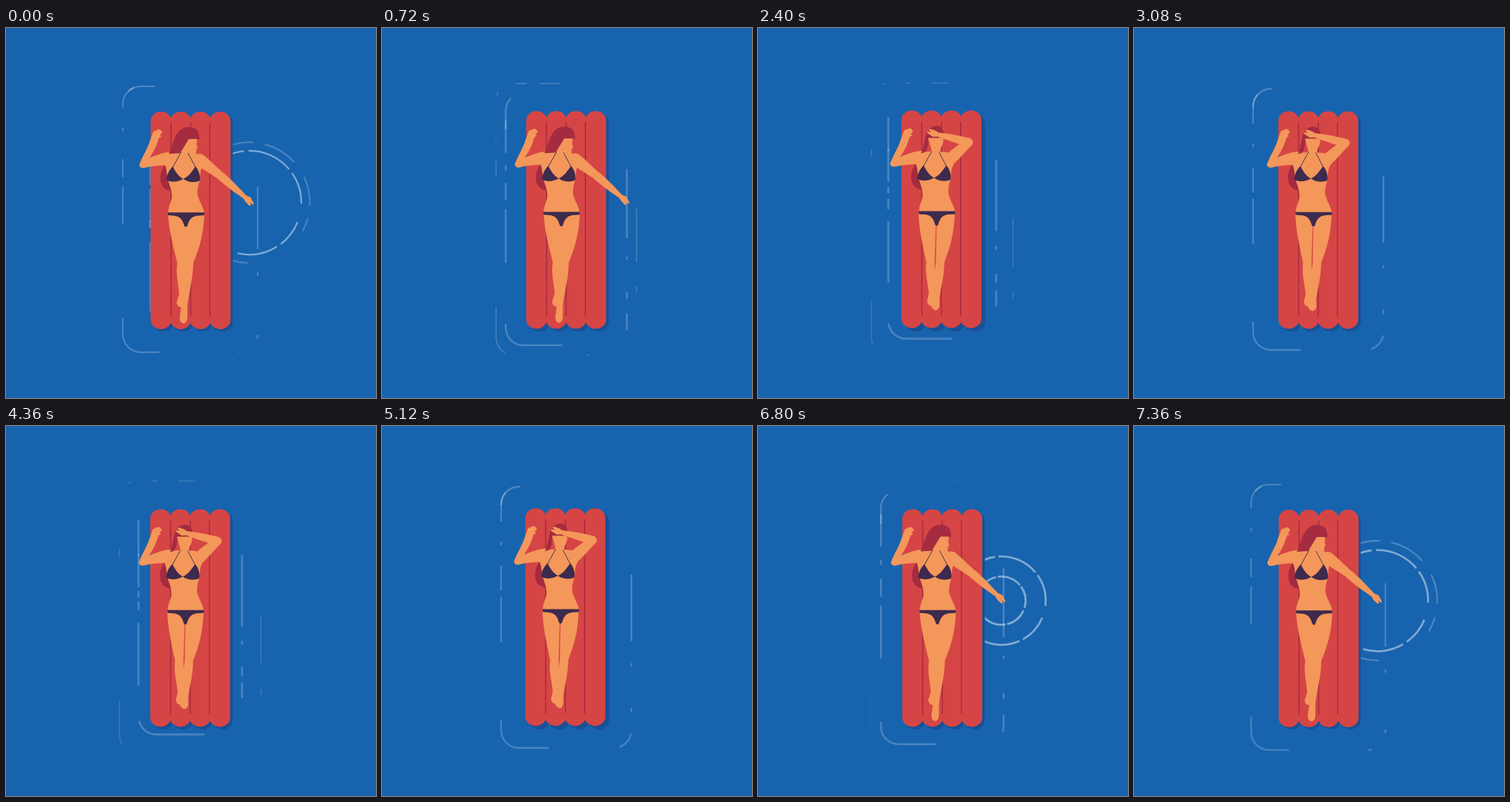
An HTML page that plays this animation: 500 px wide and 500 px high, repeating every 7.4 s.

```html
<!DOCTYPE html>
<html lang="en">
<head>
<meta charset="utf-8">
<title>Floating on a raft</title>
<style>
html, body { margin: 0; width: 100%; height: 100%; overflow: hidden; background: #1763ae; }
svg { display: block; width: 100vw; height: 100vh; }
</style>
</head>
<body>
<svg viewBox="0 0 500 500">
  <defs>
    <g id="tubes">
      <rect x="195.5" y="113" width="28" height="294" rx="14" ry="12.5"/>
      <rect x="222.2" y="113" width="28" height="294" rx="14" ry="12.5"/>
      <rect x="248.8" y="113" width="28" height="294" rx="14" ry="12.5"/>
      <rect x="275.5" y="113" width="28" height="294" rx="14" ry="12.5"/>
      <path d="M209 121H290V399H209Z"/>
    </g>
  </defs>
  <rect width="500" height="500" fill="#1763ae"/>
  <g id="ripples" fill="none" stroke="#fff"></g>
  <use id="shadow" href="#tubes" fill="#1a5094"/>
  <g id="float">
    <use href="#tubes" fill="#d64545"/>
    <path d="M223 128V390M249.5 128V390M275.5 128V390" stroke="#a92c40" stroke-width="1.6"/>
    <path d="M226 180C210 182 206 200 210 211C213 218 219 220 227 221Z" fill="#a52b40"/>
    <g fill="#f4975a">
      <path id="rightLeg"/>
      <path id="leftLeg"/>
      <path d="M236 168C230 170 222 167 214 169L214 184C218 190 217 200 219 206C222 215 225 222 224 230C222 238 219 243 219 251L268 251C267 242 262 236 260 229C257 222 260 212 262 205C263 198 262 192 266 186L269 178Q262 169 252 169Z"/>
      <path d="M228 168C218 166 206 171 194 175.5C198 169 203 161 205 153L207 148L210 147L208 144L211 142Q210 137 206 137L199 140L195 151C191 164 184 174 180 185Q181 190 187 189C198 186 208 186 219 185Z"/>
    </g>
    <path id="hair" fill="#a52b40"/>
    <path id="face" fill="#f4975a"/>
    <g fill="#3d2a4d">
      <path d="M225.5 187C221 191 217 199 217 205C222 209.5 233 208 239.5 204C234 201 229 195 225.5 187Z"/>
      <path d="M256 187C260 191 263 199 262 206C257 209.5 246 209 239.5 204C246 201 251 195 256 187Z"/>
      <path d="M218.5 249.2H268V253L258 253.7C249 255 247 261 245 267.5Q243 270 241 267.5C239 261 237 255 228 253.7L219 253Z"/>
    </g>
    <path d="M225.5 188L236.5 168M256 188L246 169" stroke="#3d2a4d" stroke-width=".9"/>
    <g fill="#f4975a">
      <g id="upperArm">
        <circle r="8"/>
        <path d="M0 -8C12 -8 22 -6 34 -5.5L34 5.5C22 6 12 8 0 8Z"/>
      </g>
      <g id="forearm">
        <circle r="5.5"/>
        <path d="M0 -5.5C16 -6 30 -4 43 -2.8L49 -4.6L58 -1.4L57.5 1L53 .6L57 3.4L55 5L48 4.4L43 2.8C30 4.5 14 5.8 0 5.5Z"/>
      </g>
    </g>
  </g>
</svg>
<script>
const LOOP = 7400;
const byId = id => document.getElementById(id);
const clamp = (v, lo = 0, hi = 1) => Math.min(hi, Math.max(lo, v));
const lerp = (a, b, k) => a + (b - a) * k;
const mod = (a, n) => ((a % n) + n) % n;
const ease = k => k * k * (3 - 2 * k);
const ramp = (t, from, to) => ease(clamp((t - from) / (to - from)));

// Piecewise linear through three keys, continued past both ends.
const through = (x, [x0, x1, x2], a, b, c) =>
  x < x1 ? lerp(a, b, (x - x0) / (x1 - x0)) : lerp(b, c, (x - x1) / (x2 - x1));

const morph = (a, b, k) => {
  const goal = b.match(/-?[\d.]+/g);
  let i = 0;
  return a.replace(/-?[\d.]+/g, v => lerp(+v, +goal[i++], k).toFixed(2));
};

// Each morph pair: resting pose, stretched pose.
const SHAPES = {
  leftLeg: [
    'M218.5 250C219 275 225 298 229 318C227 332 231 345 232.5 360L230 371Q232 378 237 377Q240 372 241 360L240.3 318L242 266L243 250Z',
    'M219 250C220 275 227 298 231.5 318C229 332 233 345 234 360L230.5 371Q232 378 237 377Q241 372 241 360L245 318L244 266L245 250Z'],
  rightLeg: [
    'M267.5 250C267 285 258 305 253.5 318C253 340 248 355 246.5 368L247 376Q246 383 241 383Q235 380 236 376L238 360L238 345L242 318L243 266L240 250Z',
    'M268 250C267 285 258 305 253 318C253 340 246 360 245 378L245 393Q243 400 239 399Q234 397 235 390L237 375L236 350L238 318L243 266L240 250Z'],
  hair: [
    'M222 171C228 158 226 146 232 139C236 133 246 132 250 137Q254 143 253 152L232 151C232 158 231 164 228 169Z',
    'M220 170C226 158 227 143 238 136C246 132 256 134 259 139Q262 145 261 151L247 151C246 158 244 164 236 169Z'],
  face: [
    'M231.5 150L252 150L252 155L251 159L249 163L248 167L247 170L250 176L233 176L236 166Z',
    'M247 150L258.5 150L257.5 157L259 162L257 164L257 169L251 171L251 176L236 176L236 168Z']
};

// Raft ripple dashes: corner, then start and end at each key age.
const WAVE_KEYS = [-760, 0, 600];
const WAVE_DASHES = [
  [0, -95, -50, -24, 18, 14, 40],
  [0, -52, -4, -2, 39, 42, 75],
  [0, -109, -100, -56, -51, -18, -13],
  [0, -126, -114, -117, -84, -81, -66],
  [0, -228, -143, -187, -126, -137, -99],
  [3, -66, 31, -41, 51, -10, 67],
  [2, -219, -122, -211, -121, -189, -110],
  [2, -103, -98, -91, -87, -78, -72],
  [2, -68, -55, -31, -25, 33, 37],
  [2, -47, -26, 4, 29, 70, 47]
];
const WAVE_TIMES = [-290, 1080, 3080, 5120];

// Hand ripple dashes in degrees.
const RING_KEYS = [.16, .6, .85];
const RING_DASHES = [
  [-100, -40, -91, -40, -75, -42],
  [-36, 20, -35, 1, -25, 3],
  [24, 80, 22, 53, 15, 28],
  [84, 164, 58, 103, 92, 107],
  [-192, -104, -130, -96, -106, -86]
];
const RING_TIMES = [6066, 6456];
const RING_LIFE = 1575;

const makePaths = count => Array.from({ length: count }, () =>
  byId('ripples').appendChild(document.createElementNS('http://www.w3.org/2000/svg', 'path')));
const waves = WAVE_TIMES.map(time => ({ time, paths: makePaths(WAVE_DASHES.length) }));
const rings = RING_TIMES.map(time => ({ time, paths: makePaths(RING_DASHES.length) }));

function setAttributes(path, attrs) {
  for (const name in attrs) path.setAttribute(name, attrs[name]);
}

function drawWave({ time, paths }, t) {
  const age = mod(t - time + 1500, LOOP) - 1500;
  const shown = age > -1080 && age < 1750;
  const inset = 9 * Math.exp(-.00145 * age);
  const r = 24, arc = r * Math.PI / 2;
  const halfW = 97 - inset, halfH = 185.5 - inset;
  const w = 2 * (halfW - r), h = 2 * (halfH - r);
  const corners = [0, arc + w, 2 * arc + w + h, 3 * arc + 2 * w + h];
  const total = 4 * arc + 2 * (w + h);
  const bend = (x, y) => `a${r} ${r} 0 0 1 ${x} ${y}`;
  const d = `M${249 - halfW} ${258.5 - halfH + r}${bend(r, -r)}h${w}${bend(r, r)}v${h}` +
    `${bend(-r, r)}h${-w}${bend(-r, -r)}z`;
  const opacity = .22 * (1 - .35 * clamp((age - 600) / 680)) * clamp((1750 - age) / 350);
  paths.forEach((path, i) => {
    const [corner, a0, b0, a1, b1, a2, b2] = WAVE_DASHES[i];
    const start = through(age, WAVE_KEYS, a0, a1, a2);
    const length = through(age, WAVE_KEYS, b0, b1, b2) - start;
    if (!shown || length <= 0) return path.setAttribute('display', 'none');
    setAttributes(path, {
      display: 'inline', d, 'stroke-opacity': opacity,
      'stroke-width': clamp(2.3 - age / 2000, 1.7, 2.7),
      'stroke-dasharray': `${length} ${total - length}`,
      'stroke-dashoffset': -mod(corners[corner] + start, total)
    });
  });
}

function drawRing({ time, paths }, t) {
  const life = mod(t - time, LOOP) / RING_LIFE;
  const radius = 83.5 * (1 - (1 - life) ** 2);
  const point = deg => {
    const a = deg * Math.PI / 180;
    return `${329 + radius * Math.cos(a)} ${236 + radius * Math.sin(a)}`;
  };
  const opacity = .45 * clamp((1 - life) / .4) ** .8;
  paths.forEach((path, i) => {
    const [a0, b0, a1, b1, a2, b2] = RING_DASHES[i];
    const start = through(life, RING_KEYS, a0, a1, a2);
    const end = through(life, RING_KEYS, b0, b1, b2);
    if (life >= 1 || end <= start) return path.setAttribute('display', 'none');
    setAttributes(path, {
      display: 'inline', 'stroke-opacity': opacity, 'stroke-width': life < .6 ? 2.7 : 2.2,
      d: `M${point(start)}A${radius} ${radius} 0 ${end - start > 180 ? 1 : 0} 1 ${point(end)}`
    });
  });
}

function drawArm(k) {
  const upper = lerp(-42, 38, k), lower = lerp(-166, 41, k);
  const x = 262, y = 178, a = upper * Math.PI / 180, length = lerp(33, 36, k);
  byId('upperArm').setAttribute('transform', `translate(${x} ${y}) rotate(${upper})`);
  byId('forearm').setAttribute('transform',
    `translate(${x + length * Math.cos(a)} ${y + length * Math.sin(a)}) rotate(${lower})`);
}

function draw(t) {
  const bob = 1 - Math.cos(t / 3700 * 2 * Math.PI);
  const drop = 3 + .15 * bob;
  byId('float').setAttribute('transform', `translate(${-bob} ${-bob})`);
  byId('shadow').setAttribute('transform', `translate(${drop} ${drop})`);

  const reach = 1 - ramp(t, 700, 1540) + ramp(t, 5360, 6090);
  const stretch = 1 - ramp(t, 1000, 2240) + ramp(t, 5240, 6260);
  for (const id in SHAPES) {
    const k = id.endsWith('Leg') ? stretch : reach;
    byId(id).setAttribute('d', morph(...SHAPES[id], k));
  }
  drawArm(reach);
  waves.forEach(wave => drawWave(wave, t));
  rings.forEach(ring => drawRing(ring, t));
}

const began = performance.now();
function tick() {
  draw((performance.now() - began) % LOOP);
  requestAnimationFrame(tick);
}
tick();
</script>
</body>
</html>
```
